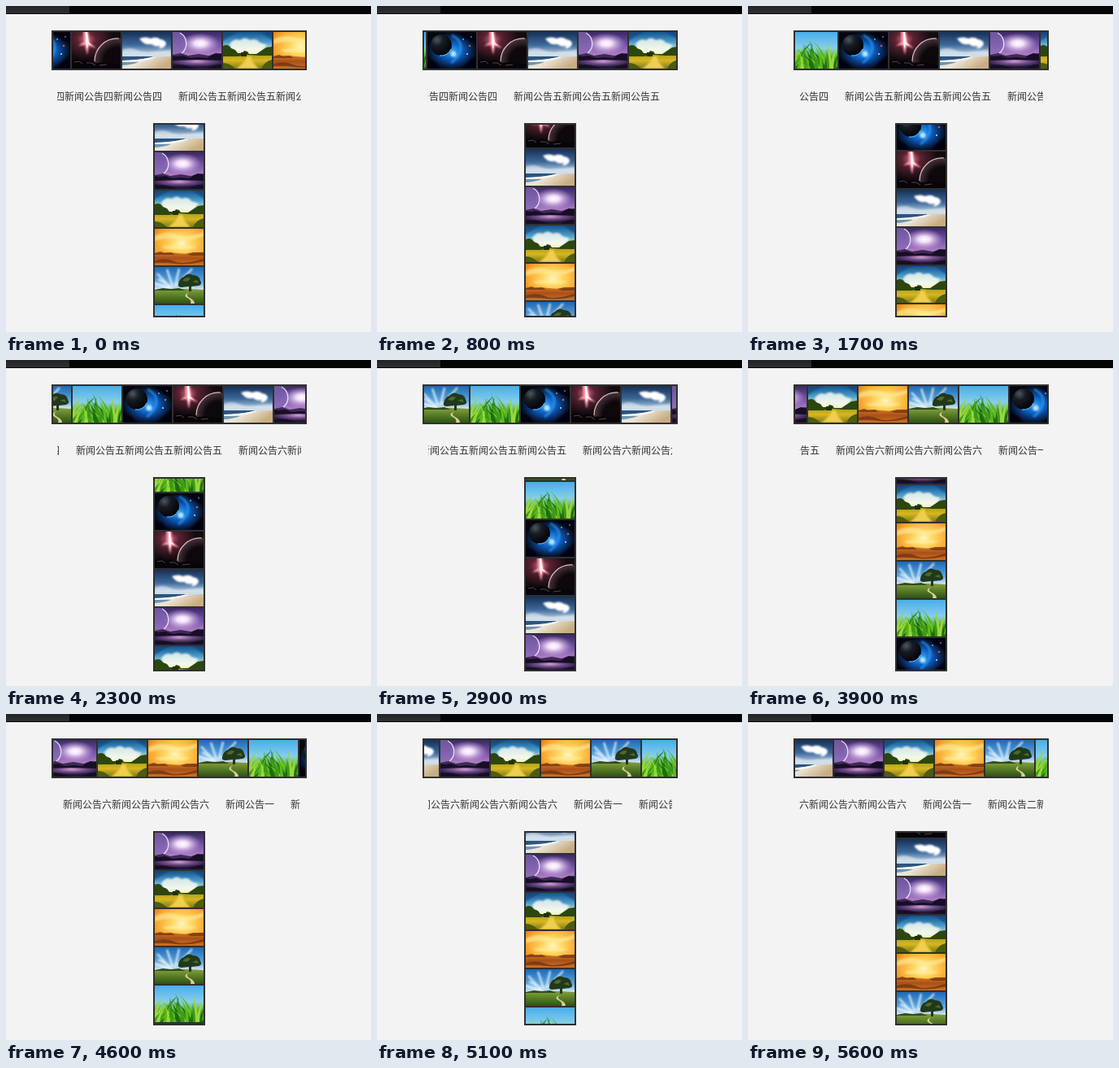
Recreate the animation shown at these times as an HTML page. Size 449 by 401 pixels, loop 5.7 s.

```html
<!DOCTYPE html>
<html lang="zh-CN">
<head>
<meta charset="utf-8">
<title>滚动图片与公告</title>
<style>
  html, body { margin: 0; width: 100%; height: 100%; overflow: hidden; background: #f3f3f3; }
  svg { display: block; }
  text { font: 12px "Noto Sans CJK SC", "Noto Sans CJK", sans-serif; fill: #333; }
</style>
</head>
<body>
<svg id="stage" width="449" height="401" viewBox="0 0 449 401">
  <defs>
    <linearGradient id="tab" x2="0" y2="1"><stop stop-color="#232225"/><stop offset="1" stop-color="#302f32"/></linearGradient>
    <radialGradient id="nebula" cx=".5" cy=".52" r=".52"><stop stop-color="#38a4f6"/><stop offset=".4" stop-color="#0c62c4"/><stop offset=".75" stop-color="#08285c"/><stop offset="1" stop-color="#04070f"/></radialGradient>
    <radialGradient id="moon" cx=".3" cy=".25" r=".75"><stop stop-color="#4f565c"/><stop offset=".4" stop-color="#171c24"/><stop offset="1" stop-color="#020409"/></radialGradient>
    <radialGradient id="pink" cx=".3" cy=".2" r=".55"><stop stop-color="#d4687e"/><stop offset=".35" stop-color="#5a2232"/><stop offset="1" stop-color="#120b10"/></radialGradient>
    <radialGradient id="globe"><stop offset=".6" stop-color="#0d080c"/><stop offset="1" stop-color="#4a333b"/></radialGradient>
    <linearGradient id="coast" x2="0" y2="1"><stop stop-color="#173056"/><stop offset=".35" stop-color="#3c689a"/><stop offset=".66" stop-color="#cfe0ec"/></linearGradient>
    <linearGradient id="shore" x2="1" y2=".4"><stop stop-color="#cfdce4"/><stop offset=".45" stop-color="#ece6d8"/><stop offset="1" stop-color="#c9ad82"/></linearGradient>
    <linearGradient id="dusk" x2="0" y2="1"><stop stop-color="#3a2866"/><stop offset=".4" stop-color="#7e5cae"/><stop offset=".66" stop-color="#b985c4"/></linearGradient>
    <radialGradient id="flare"><stop stop-color="#fff"/><stop offset=".3" stop-color="#f8e4fb" stop-opacity=".95"/><stop offset="1" stop-color="#c39ae0" stop-opacity="0"/></radialGradient>
    <radialGradient id="lake" cx=".5" cy=".2" r=".6"><stop stop-color="#d3a0d0"/><stop offset=".45" stop-color="#74508c"/><stop offset="1" stop-color="#22163a"/></radialGradient>
    <linearGradient id="noon" x2="0" y2="1"><stop stop-color="#12548f"/><stop offset=".28" stop-color="#4c9dcc"/><stop offset=".55" stop-color="#f2f2cc"/></linearGradient>
    <linearGradient id="field" x2="0" y2="1"><stop stop-color="#a89c18"/><stop offset=".45" stop-color="#d8b622"/><stop offset="1" stop-color="#7c7c14"/></linearGradient>
    <radialGradient id="sunset" cx=".55" cy=".4" r=".7"><stop stop-color="#fff6bd"/><stop offset=".3" stop-color="#ffd560"/><stop offset=".75" stop-color="#f6a42c"/><stop offset="1" stop-color="#dc7a16"/></radialGradient>
    <linearGradient id="desert" x2="0" y2="1"><stop stop-color="#d07a1e"/><stop offset=".45" stop-color="#a9501a"/><stop offset="1" stop-color="#cf711f"/></linearGradient>
    <linearGradient id="clear" x2="0" y2="1"><stop stop-color="#1d68b4"/><stop offset=".4" stop-color="#5ca6de"/><stop offset=".64" stop-color="#e2f0f6"/></linearGradient>
    <linearGradient id="meadow" x2="0" y2="1"><stop stop-color="#8a9e44"/><stop offset=".4" stop-color="#5f8428"/><stop offset="1" stop-color="#2f5214"/></linearGradient>
    <linearGradient id="cyan" x2="0" y2="1"><stop stop-color="#47aee8"/><stop offset=".65" stop-color="#a4dcf2"/></linearGradient>
    <linearGradient id="turf" x2="0" y2="1"><stop stop-color="#58b41c" stop-opacity="0"/><stop offset=".5" stop-color="#48a418"/><stop offset="1" stop-color="#1f6c0e"/></linearGradient>
    <filter id="soft" x="-.3" y="-.3" width="1.6" height="1.6"><feGaussianBlur stdDeviation="1.1"/></filter>

    <symbol id="space" viewBox="0 0 60 45">
      <path fill="url(#nebula)" d="M0 0h60v45H0z"/>
      <g filter="url(#soft)">
        <path fill="none" stroke="#2f98f2" stroke-width="3" opacity=".7" d="M30 4q12 6 11 16t-12 18"/>
        <path fill="#03060e" opacity=".8" d="M36-2h26v16Q48 12 36-2zM-2 34q9 0 14 5l3 7H-2zM62 28v18H42q7-11 20-18z"/>
        <circle cx="32" cy="27" r="3.5" fill="#b5e4ff"/>
      </g>
      <circle cx="17" cy="16" r="13" fill="url(#moon)"/>
      <path fill="none" stroke="#7cc6fa" d="M29 21a13 13 0 0 1-14 8"/>
      <g fill="#e9f4ff"><circle cx="44" cy="9" r=".8"/><circle cx="49" cy="27" r=".9"/><circle cx="54" cy="6" r=".7"/></g>
      <circle cx="52" cy="17" r="1.3" fill="#d4583e"/>
    </symbol>

    <symbol id="comet" viewBox="0 0 60 45">
      <path fill="url(#pink)" d="M0 0h60v45H0z"/>
      <path fill="#ff9fb0" filter="url(#soft)" d="M14-2h6l2 15 8 7-9-3-2 11-3-12-8 1 7-5z"/>
      <path fill="#fff0f2" d="M17 0h2l2 13 4 4-5-2-1 6-2-7z"/>
      <circle cx="56" cy="36" r="28" fill="url(#globe)"/>
      <path fill="none" stroke="#d9bcc2" stroke-width="1.2" d="M28 36A28 28 0 0 1 58 8"/>
      <path fill="#070509" d="M0 35l7-2 6 3 7-2 8 4 12-1 20 3v5H0z"/>
      <path fill="none" stroke="#56434a" d="M3 37l6-1 4 3M18 38l6 0 5 3M34 41l9-1"/>
    </symbol>

    <symbol id="beach" viewBox="0 0 60 45">
      <path fill="url(#coast)" d="M0 0h60v45H0z"/>
      <g filter="url(#soft)" fill="#fff">
        <path d="M21 8q8-3 14 0 7-3 12 1 7 1 7 6-3 6-9 5l2-3q-7 2-11-2-9 2-15-7z"/>
        <path opacity=".5" d="M0 22q9-4 18 0t20 2l22-2v6H0z"/>
      </g>
      <path fill="url(#shore)" d="M0 31l60-1v15H0z"/>
      <path fill="#2c5580" d="M0 30h38q-10 4-38 5z"/>
      <path fill="#6f94b0" d="M0 37q12-1 20 0-8 3-20 4z"/>
      <path fill="#fff" opacity=".8" d="M0 35q20 0 36-4l6 0q-16 6-42 6z"/>
    </symbol>

    <symbol id="purple" viewBox="0 0 60 45">
      <path fill="url(#dusk)" d="M0 0h60v45H0z"/>
      <ellipse cx="34" cy="14" rx="24" ry="13" fill="url(#flare)"/>
      <circle cx="2" cy="14" r="15" fill="#8468b4" opacity=".7"/>
      <path fill="none" stroke="#ecdcf6" stroke-width="1.3" d="M9 1a15 15 0 0 1 2 25"/>
      <path fill="#3f2a58" d="M0 28l10-2 9 3 13-2 12 2 16-3v9H0z"/>
      <path fill="url(#lake)" d="M0 34h60v11H0z"/>
      <path fill="#170e26" d="M0 29l5 1 8-1 9 3 10-1 11 1 5-4 5-2 7 1v8l-30-1-30 1zM0 41q10-2 20 1l9 3H0zM60 40q-12 0-18 5h18z"/>
    </symbol>

    <symbol id="path" viewBox="0 0 60 45">
      <path fill="url(#noon)" d="M0 0h60v45H0z"/>
      <g filter="url(#soft)">
        <path fill="#fffff2" opacity=".8" d="M8 15q5-8 13-5 6-5 12 0 8-3 12 3l9 3-7 8H12z"/>
        <path fill="#0c3f6e" opacity=".6" d="M-2-2h24Q10 4-2 12zM44-2h18v13Q52 4 44-2z"/>
      </g>
      <path fill="url(#field)" d="M0 27h60v18H0z"/>
      <path fill="#2c470e" d="M0 17q6-3 10 3l5 2 3 4h6l2-3 4 1 2 3h9l6-4 6-4 7-1v11H44l-14-1-12 2H0z"/>
      <path fill="#f0cf50" filter="url(#soft)" d="M29 30h6q-2 5 9 15H16q13-9 13-15z"/>
      <path fill="#1f3209" d="M22 25h7v5h-7z"/>
      <path fill="#4c5c10" d="M0 38q8 0 15 7H0zM60 34q-10 3-13 11h13z"/>
    </symbol>

    <symbol id="sand" viewBox="0 0 60 45">
      <path fill="url(#sunset)" d="M0 0h60v45H0z"/>
      <path fill="#fff0a4" opacity=".6" filter="url(#soft)" d="M0 9q15-7 28-2t32-3v5q-17 7-32 4T0 15zM8 22q20-4 44 0l-8 3H14z"/>
      <path fill="url(#desert)" d="M0 30q14-2 28 0t32-1v16H0z"/>
      <path fill="#6e3012" opacity=".75" d="M0 30l7-2 5 2 8-1 5 3H0zM39 31l8-2 13 0v4H45zM0 39q14-4 24 1t36-3v3q-20 5-34 3T0 42z"/>
    </symbol>

    <symbol id="tree" viewBox="0 0 60 45">
      <path fill="url(#clear)" d="M0 0h60v45H0z"/>
      <g filter="url(#soft)" fill="none" stroke="#fff" stroke-width="2.4" opacity=".75">
        <path d="M20 26L3 8M22 24L15 3M25 24L30 2M28 22L46 2M0 20l18 6M4 15l14 8"/>
      </g>
      <path fill="url(#meadow)" d="M0 29q20-4 60-1v17H0z"/>
      <path fill="#2f4c1c" d="M0 28l10-2 10 1 10-1 8 3H0z"/>
      <path fill="#d9cf9c" d="M42 31q-5 4 1 7t6 7h-5q2-4-4-7t2-7z"/>
      <path fill="#22381a" d="M29 21q1-7 7-9 5-6 11-2 8 0 9 7 3 4-2 6l-9 1v6h-3v-6l-9 1q-5 0-4-4z"/>
      <path fill="#4c6a30" d="M34 17q5-6 10-3l-4 4zM46 18l6-2 2 4z"/>
    </symbol>

    <symbol id="grass" viewBox="0 0 60 45">
      <path fill="url(#cyan)" d="M0 0h60v45H0z"/>
      <path fill="url(#turf)" d="M0 20h60v25H0z"/>
      <g id="blades"></g>
    </symbol>
  </defs>

  <path fill="#f3f3f3" d="M0 0h449v401H0z"/>
  <path fill="#050505" d="M0 0h449v10H0z"/>
  <path fill="url(#tab)" d="M0 0h78v9H0z"/>

  <path fill="#303030" d="M56 30h314v49H56zM181 144h64v239h-64z"/>
  <svg x="58" y="32" width="310" height="45"><g id="row"></g></svg>
  <svg x="183" y="146" width="60" height="235"><g id="column"></g></svg>
  <svg x="63" y="100" width="300" height="26"><g id="news"></g></svg>
</svg>

<script>
  const byId = id => document.getElementById(id);
  const scenes = ["space", "comet", "beach", "purple", "path", "sand", "tree", "grass"];

  function add(parent, tag, attrs, content = "") {
    const el = document.createElementNS("http://www.w3.org/2000/svg", tag);
    for (const key in attrs) el.setAttribute(key, attrs[key]);
    el.textContent = content;
    parent.append(el);
  }

  // Fan of curved blades, tall ones behind
  const greens = ["#1f6c10", "#3a9a18", "#5cb820", "#9ad63c"];
  for (let i = 0; i < 44; i++) {
    const x = (i * 23) % 64 - 2;
    const lean = Math.sin(i * 2.3) * 15;
    const top = 7 + (i * 11) % 19 + i / 4;
    add(byId("blades"), "path", {
      fill: greens[(i * 3 + (i >> 3)) % 4],
      d: `M${x - 2} 46Q${x - 1} ${top + 12} ${x + lean} ${top}Q${x + 2.5} ${top + 13} ${x + 2} 46z`
    });
  }

  for (let i = 0; i < 24; i++) {
    const tile = { href: "#" + scenes[i % 8], width: 60, height: 45 };
    add(byId("row"), "use", { ...tile, x: i * 62 });
    add(byId("column"), "use", { ...tile, y: i * 47 });
  }

  let newsX = -51;
  for (const [mark, times] of [["四", 3], ["五", 3], ["六", 3], ["一", 1], ["二", 3]]) {
    add(byId("news"), "text", { x: newsX, y: 16 }, ("新闻公告" + mark).repeat(times));
    newsX += 60 * times + 20;
  }

  const move = (id, x, y) => byId(id).setAttribute("transform", `translate(${x} ${y})`);

  // Steady scroll in 100 ms steps, with one skip ahead on the way
  function draw(now) {
    const step = Math.floor((now % 5700) / 100);
    const shift = step * 5.475 + (step >= 34 ? 90.4 : 0);
    const whole = Math.floor(shift);
    move("row", whole - 39 - 496, 0);
    move("column", 0, whole - 107 - 376);
    move("news", -Math.round(shift), 0);
  }

  const start = performance.now();
  function tick() {
    draw(performance.now() - start);
    requestAnimationFrame(tick);
  }
  tick();
</script>
</body>
</html>
```
